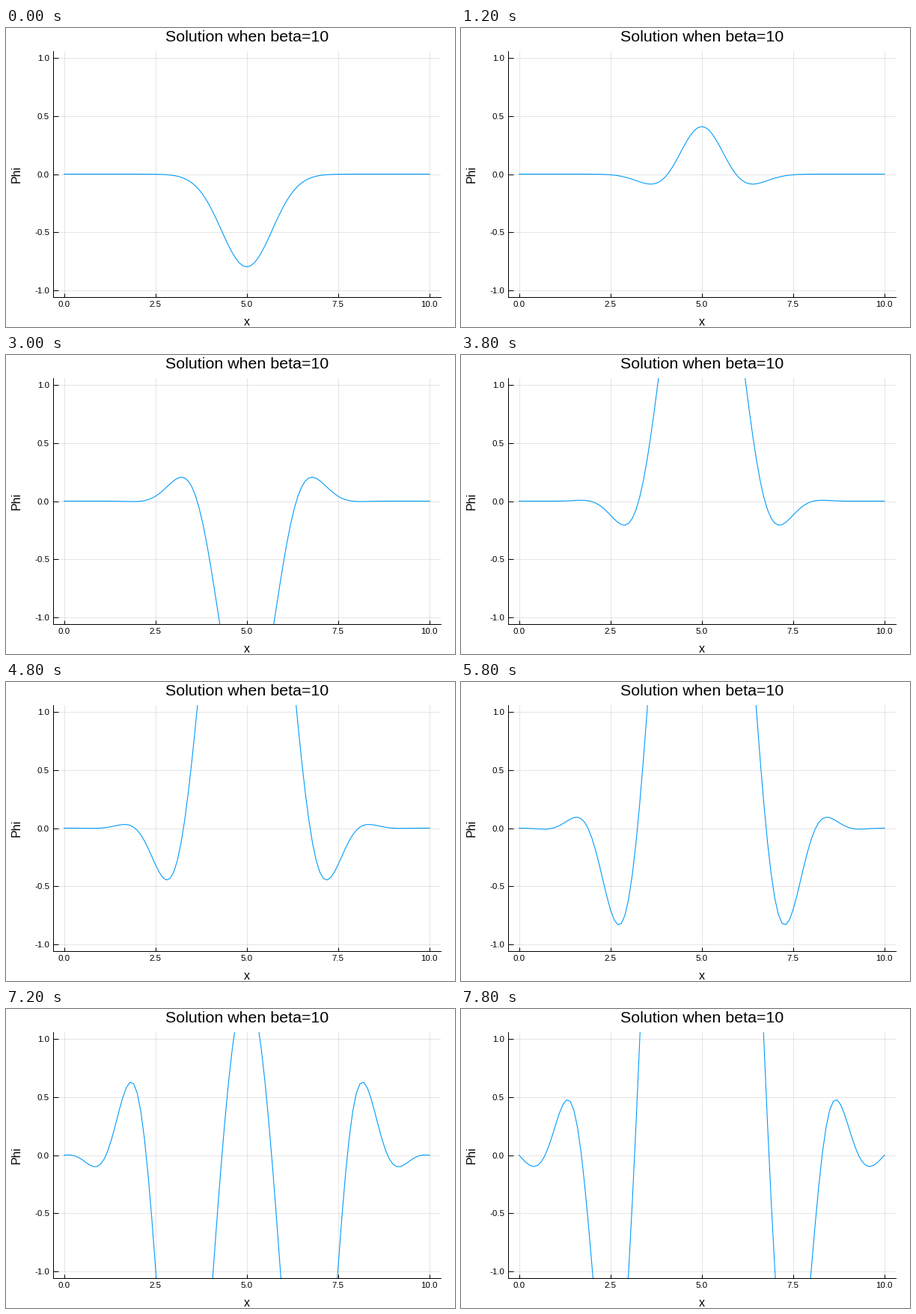
Animation of 600 by 400 pixels, one loop 8000 ms. Source, as a matplotlib script:

```python
import numpy as np
import matplotlib.pyplot as plt
from matplotlib.animation import FuncAnimation

W, H, DPI = 600, 400, 100
PX = 72 / DPI  # one pixel in points
FRAMES, INTERVAL = 40, 200
BETA = 10
DT = 0.005
FIRST, EVERY = 48, 50  # steps before the first frame, steps per frame
LEFT, RIGHT, TOP, BOTTOM = 63, 580.5, 31, 360

plt.rcParams["font.family"] = "Liberation Sans"
plt.rcParams["axes.unicode_minus"] = False

x = np.linspace(0, 10, 101)
DX = x[1] - x[0]


def solve():
    """Klein-Gordon field with fixed ends, stepped by explicit Euler."""
    phi, vel = np.exp(-(x - 5) ** 2), np.zeros_like(x)
    shots = []
    for step in range(FIRST + EVERY * (FRAMES - 1) + 1):
        if step >= FIRST and (step - FIRST) % EVERY == 0:
            shots.append(phi)
        acc = np.zeros_like(x)
        acc[1:-1] = (phi[2:] - 2 * phi[1:-1] + phi[:-2]) / DX ** 2 \
            - BETA ** 2 * phi[1:-1]
        phi, vel = phi + DT * vel, vel + DT * acc
    return shots


fields = solve()

fig = plt.figure(figsize=(W / DPI, H / DPI), dpi=DPI, facecolor="white")
ax = fig.add_axes([LEFT / W, 1 - BOTTOM / H,
                   (RIGHT - LEFT) / W, (BOTTOM - TOP) / H])
ax.set(xlim=(-0.3, 10.3), ylim=(-1.06, 1.06))
ax.set_xticks(np.arange(0, 10.1, 2.5))
ax.set_yticks(np.arange(-1, 1.1, 0.5))
ax.xaxis.set_major_formatter("{x:.1f}")
ax.yaxis.set_major_formatter("{x:.1f}")
ax.tick_params(direction="in", width=PX, labelsize=11.5 * PX)
ax.tick_params(axis="x", length=5 * PX, pad=5 * PX)
ax.tick_params(axis="y", length=7 * PX, pad=5 * PX)
ax.grid(color="black", alpha=0.1, linewidth=PX)
ax.set_axisbelow(True)
for side in ("top", "right"):
    ax.spines[side].set_visible(False)
for side in ("left", "bottom"):
    ax.spines[side].set_linewidth(PX)


def label(px, py, text, size, **kw):
    fig.text(px / W, 1 - py / H, text, fontsize=size * PX, ha="center", **kw)


label(322.5, 18, "Solution when beta=10", 21.4, va="baseline")
label(321.8, 398, "x", 16, va="baseline")
label(14, 195.5, "Phi", 16, va="center", rotation=90)

curve, = ax.plot(x, fields[0], color="#009afa", linewidth=1.1 * PX)


def draw(i):
    curve.set_ydata(fields[i])
    return curve,


anim = FuncAnimation(fig, draw, frames=FRAMES, interval=INTERVAL,
                     repeat=True, repeat_delay=0)
plt.show()
```
